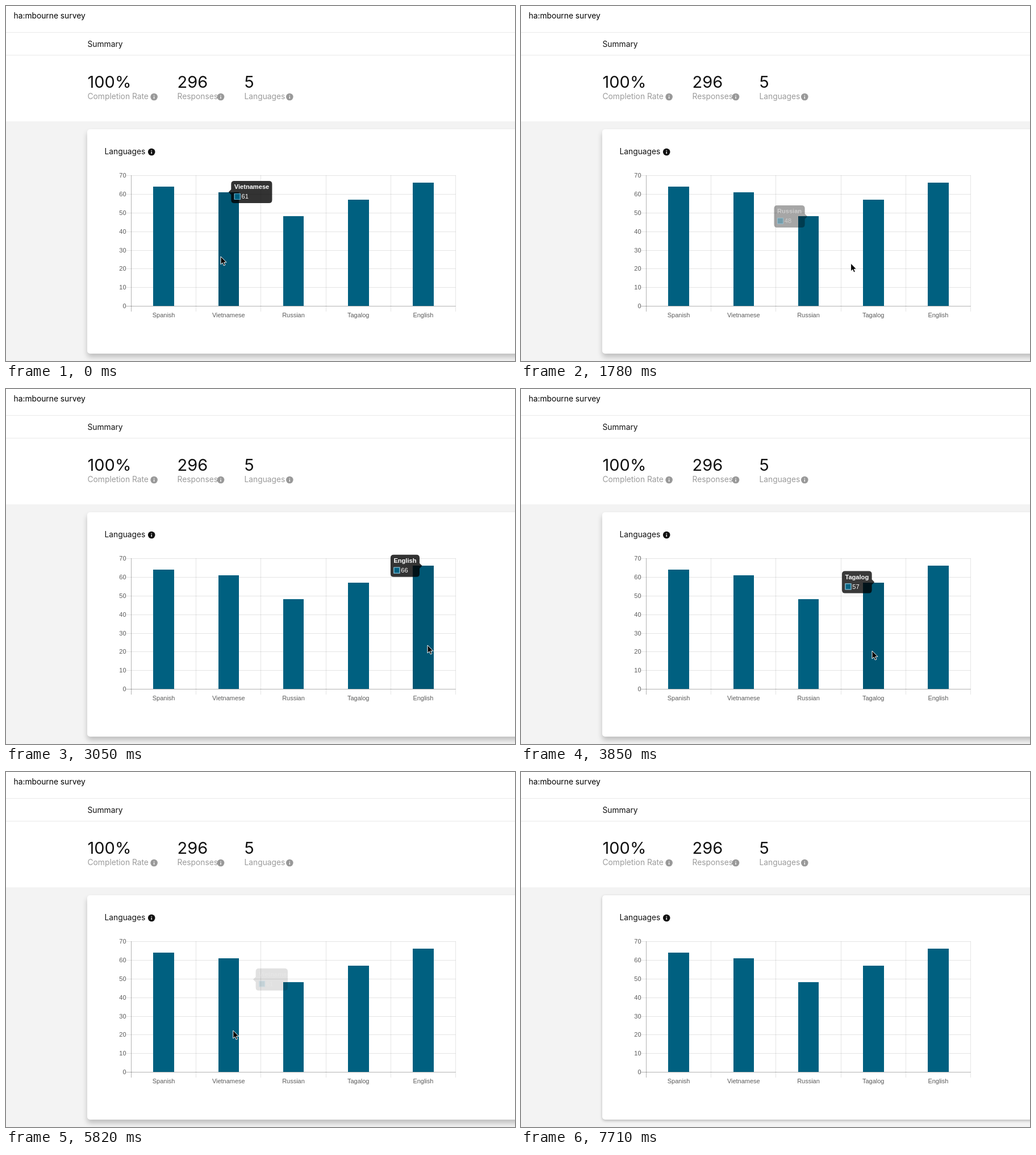
Recreate the animation shown at these times as an HTML page. Size 896 by 625 pixels, loop 8430 ms.

```html
<!DOCTYPE html>
<html lang="en">
<head>
<meta charset="utf-8">
<title>Survey summary</title>
<style>
  html, body { margin: 0; width: 100%; height: 100%; overflow: hidden; background: #fff; }
  #stage { position: relative; width: 896px; height: 625px; overflow: hidden; background: #fff; }
  #back { position: absolute; top: 203px; width: 100%; height: 422px; background: #f3f3f3; }
  #card { position: absolute; left: 143px; top: 217px; width: 800px; height: 395px; border-radius: 5px; background: #fff; }
  svg { position: absolute; left: 0; top: 0; }
  .ui { font-family: Inter, sans-serif; font-size: 13.8px; fill: #111; }
  .big { font-size: 29px; }
  .grey { fill: #9b9b9b; }
  .chart { font: 10.97px "Liberation Sans", Arial, sans-serif; fill: #5c5c5c; }
  .chart rect { shape-rendering: crispEdges; }
  #tip text { font: 11.1px "Liberation Sans", Arial, sans-serif; fill: #fff; }
  #tip #name { font-weight: bold; }
</style>
</head>
<body>
<div id="stage">
  <div id="back"></div>
  <div id="card"></div>
  <svg id="svg" width="896" height="625" viewBox="0 0 896 625">
    <path d="M0 46.5H896M0 86.5H896" stroke="#e9e9e9"/>
    <g class="ui">
      <text x="13.5" y="22" fill="#000">ha:mbourne survey</text>
      <text x="143.5" y="71.5">Summary</text>
      <text x="173.5" y="261">Languages</text>
    </g>
    <g id="stats" class="ui"></g>
    <g id="icons"></g>
    <g id="chart" class="chart"></g>
    <g id="tip">
      <path id="bubble" fill="#000" fill-opacity=".8"/>
      <text id="name" x="5.5" y="14.4"></text>
      <rect x="5.5" y="21.9" width="11" height="11" fill="#fff"/>
      <rect x="6" y="22.4" width="10" height="10" fill="none" stroke="#55a9cc"/>
      <rect x="6.5" y="22.9" width="9" height="9" fill="#006080"/>
      <text id="value" x="18.3" y="31.2"></text>
    </g>
    <path id="cursor" d="M0 0V14L3.2 11L5.3 16L7.8 15L5.7 10.2H10Z" fill="#000" stroke="#fff"/>
  </svg>
</div>
<script>
const LOOP = 8430, HOVER = 400, LAG = 28, BOX_H = 39, ARROW = 4.6;
const LEFT = 220.5, STEP = 114.2, BASE = 528.2, UNIT = 3.286, BAR_W = 36.6;
const $ = id => document.getElementById(id);
const mix = (a, b, k) => a + (b - a) * k;
const clamp = k => Math.max(0, Math.min(1, k));
const easeOut = k => 1 - (1 - clamp(k)) ** 4;
const smooth = k => k * k * (3 - 2 * k);
const pixel = v => Math.round(v) + .5;

function add(parent, tag, attrs, text = '') {
  const el = document.createElementNS('http://www.w3.org/2000/svg', tag);
  for (const key in attrs) el.setAttribute(key, attrs[key]);
  el.textContent = text;
  return parent.appendChild(el);
}

function infoIcon(x, y, color) {
  add($('icons'), 'circle', { cx: x, cy: y, r: 6.3, fill: color });
  add($('icons'), 'path', { d: `M${x} ${y - 3.3}v1.4M${x} ${y - .7}v4`, stroke: '#fff', 'stroke-width': 1.4 });
}

[['100%', 'Completion Rate', 143.5, 260.6], ['296', 'Responses', 301.5, 378], ['5', 'Languages', 419.5, 499.3]]
  .forEach(([num, label, x, iconX]) => {
    add($('stats'), 'text', { x, y: 144.3, class: 'big' }, num);
    add($('stats'), 'text', { x, y: 164, class: 'grey' }, label);
    infoIcon(iconX, 160, '#999');
  });
infoIcon(256.2, 257, '#111');

// Grid, axes and bars
const chart = $('chart');
const line = (d, alpha) => add(chart, 'path', { d, stroke: `rgba(0,0,0,${alpha})` });
for (let v = 0; v <= 70; v += 10) {
  const y = pixel(BASE - v * UNIT);
  line(`M211.5 ${y}H791.5`, v ? .1 : .3);
  add(chart, 'text', { x: 211.5, y: y + 3.4, 'text-anchor': 'end' }, v);
}
for (let i = 0; i <= 5; i++) line(`M${Math.floor(LEFT + i * STEP) + .5} 298V538`, i ? .1 : .3);

const bars = [['Spanish', 64], ['Vietnamese', 61], ['Russian', 48], ['Tagalog', 57], ['English', 66]]
  .map(([name, value], i) => {
    const cx = LEFT + (i + .5) * STEP, top = BASE - value * UNIT;
    add(chart, 'text', { x: cx, y: 548, 'text-anchor': 'middle' }, name);
    const el = add(chart, 'rect', { x: cx - BAR_W / 2, y: top, width: BAR_W, height: BASE - top });
    $('name').textContent = name;
    const w = $('name').getComputedTextLength() + 11;
    const caretRight = i > 1;
    const x = caretRight ? cx - 6.4 - w : cx + 6.4;
    return { name, value, el, cx, top, caretRight, box: { x, y: top - BOX_H / 2, w } };
  });

// Pointer moves: start, duration, destination
const home = { x: 378, y: 441 };
const moves = [
  [620, 350, 511, 455], [1620, 250, 609, 453], [2470, 250, 742, 451], [3340, 340, 618, 461],
  [4500, 287, 494, 462], [5480, 405, 393, 455], [6400, 366, 275, 452], [7260, 220, 498, 588]
];

function pointerAt(t) {
  let { x, y } = home;
  for (const [start, duration, toX, toY] of moves) {
    const k = clamp((t - start) / duration);
    x = mix(x, toX, smooth(k));
    y = mix(y, toY, easeOut(k));
  }
  return { x, y };
}

function barUnder({ x, y }) {
  return bars.find(b => Math.abs(x - b.cx) < BAR_W / 2 && y > b.top && y < BASE);
}

// Hover changes follow from the pointer; the loop opens late in the first one
const events = [{ time: -255, bar: bars[1], on: 1 }];
for (let time = 0, last = bars[1]; time < LOOP; time += 2) {
  const bar = barUnder(pointerAt(time - LAG));
  if (bar === last) continue;
  if (last) events.push({ time, bar: last, on: 0 });
  if (bar) events.push({ time, bar, on: 1 });
  last = bar;
}

function tooltipAt(t) {
  let state = { ...bars[0].box, op: 1 }, bar;
  events.forEach((event, n) => {
    if (event.time > t) return;
    bar = event.bar;
    const end = Math.min(t, events[n + 1]?.time ?? t);
    const k = easeOut((end - event.time) / HOVER);
    const goal = { ...bar.box, op: event.on };
    for (const key in goal) goal[key] = mix(state[key], goal[key], k);
    state = goal;
  });
  return { ...state, bar };
}

function drawTooltip(t) {
  const { x, y, w, op, bar } = tooltipAt(t);
  const r = 5.5, h = BOX_H, m = h / 2, a = ARROW;
  const right = bar.caretRight ? `V${m - a}L${w + a} ${m}L${w} ${m + a}` : '';
  const left = bar.caretRight ? '' : `V${m + a}L${-a} ${m}L0 ${m - a}`;
  $('bubble').setAttribute('d',
    `M${r} 0H${w - r}Q${w} 0 ${w} ${r}${right}V${h - r}Q${w} ${h} ${w - r} ${h}` +
    `H${r}Q0 ${h} 0 ${h - r}${left}V${r}Q0 0 ${r} 0Z`);
  $('name').textContent = bar.name;
  $('value').textContent = bar.value;
  $('tip').setAttribute('transform', `translate(${x} ${y})`);
  for (const part of $('tip').children) part.setAttribute('opacity', op < .01 ? 0 : op);
}

function drawBars(t) {
  for (const bar of bars) {
    const dark = events.filter(e => e.bar === bar)
      .reduce((sum, e) => sum + (e.on ? 1 : -1) * easeOut((t - e.time) / HOVER), 0);
    bar.el.setAttribute('fill', `rgb(0,${mix(96, 86, dark)},${mix(128, 115, dark)})`);
  }
}

function drawCursor(t) {
  const { x, y } = pointerAt(t);
  $('cursor').setAttribute('transform', `translate(${x} ${y})`);
  $('cursor').style.display = t < 7540 ? '' : 'none';
}

function drawShadow(t) {
  const k = clamp((t - 7420) / 290);
  $('card').style.boxShadow = `0 ${mix(6, 2, k)}px ${mix(10, 5, k)}px rgba(0,0,0,${mix(.22, .25, k)})`;
}

const begin = performance.now();
function frame() {
  const t = (performance.now() - begin) % LOOP;
  drawBars(t);
  drawTooltip(t);
  drawCursor(t);
  drawShadow(t);
  requestAnimationFrame(frame);
}
frame();
</script>
</body>
</html>
```
